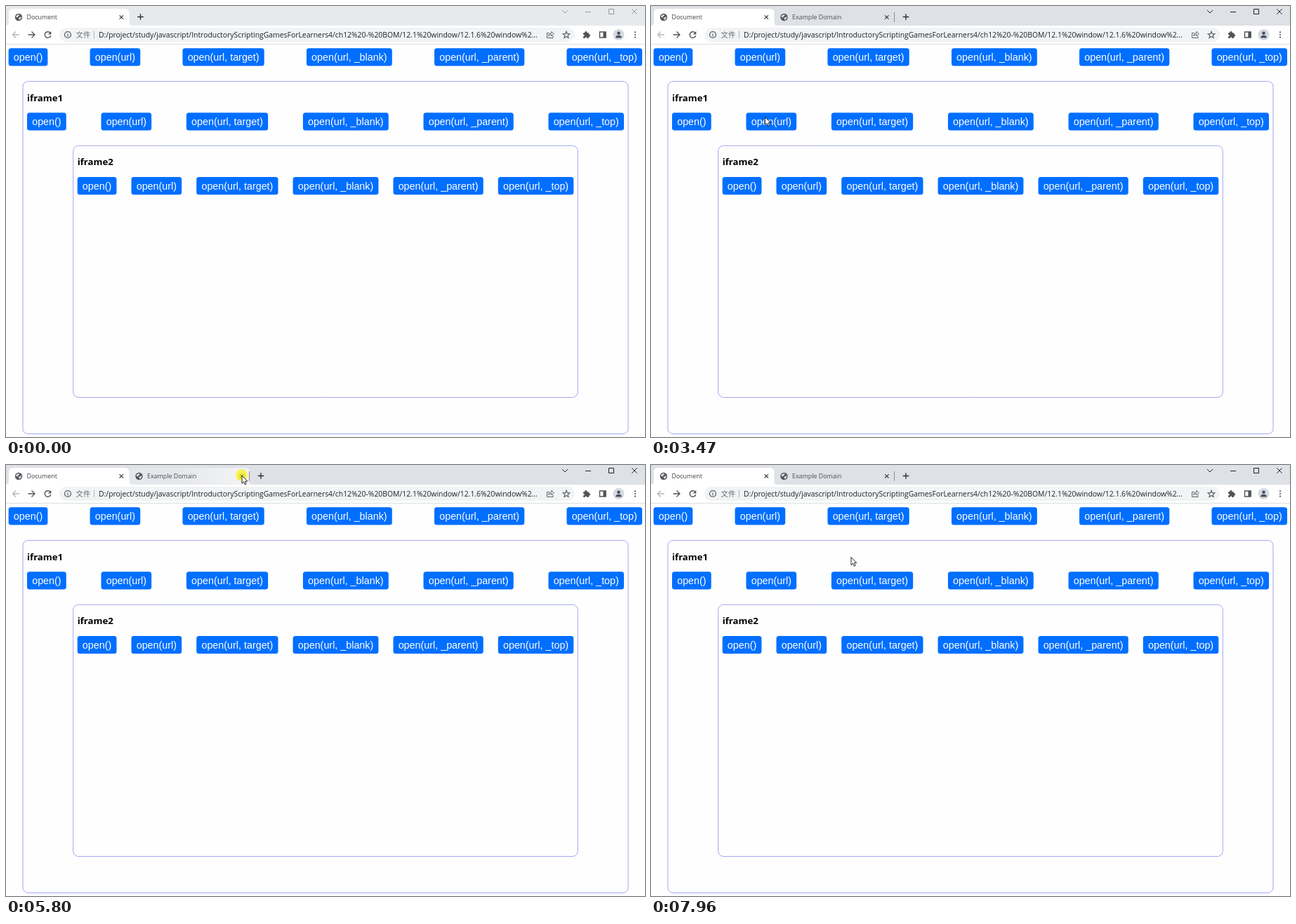
An HTML page with a canvas for the animation above (8000 ms loop, 910 by 615 pixels).

```html
<!DOCTYPE html>
<html lang="en">
<head>
<meta charset="utf-8">
<title>Opening windows</title>
<style>
  html, body { margin: 0; width: 100%; height: 100%; overflow: hidden; background: #fff; }
  canvas { display: block; width: 910px; height: 615px; }
</style>
</head>
<body>
<canvas id="stage" width="910" height="615"></canvas>
<script>
const c = document.getElementById('stage').getContext('2d');
const LOOP = 8000, PITCH = 171.5, GROW = 150;
const UI = '"Open Sans", "Noto Sans", "Noto Sans CJK SC", "Noto Sans CJK", sans-serif';
const ARIAL = '"Liberation Sans", Arial, sans-serif';
const INK = '#202124', ICON = '#505357', PALE = '#b4b7bb';
const FILE_URL = 'D:/project/study/javascript/IntroductoryScriptingGamesForLearners4' +
  '/ch12%20-%20BOM/12.1%20window/12.1.6%20window%2...';
const SITE_URL = 'summon.test';
const LABELS = ['open()', 'open(url)', 'open(url, target)', 'open(url, _blank)',
  'open(url, _parent)', 'open(url, _top)'];

// Tabs in strip order, with opening and closing times.
const TABS = [
  { title: 'Document', open: -999, close: 9999 },
  { title: 'Example Domain', open: 3942, close: 5230 },
  { title: 'Example Domain', open: 1122, close: 5890 },
  { title: 'Example Domain', open: 6750, close: 9999 }
];

// [start, page, active tab]
const VIEWS = [
  [0, 'doc', 0], [1122, 'blank', 2], [1200, 'site', 2], [3100, 'doc', 0],
  [3942, 'blank', 1], [4060, 'site', 1], [5230, 'doc', 0],
  [6750, 'blank', 3], [6850, 'site', 3], [7550, 'doc', 0]
];

// [time, x, y]
const PATH = [
  [30, 832, 604], [830, 171, 79], [1000, 171, 79], [1150, 164, 77],
  [1530, 164, 77], [1720, 158, 22], [2230, 792, 45], [2690, 792, 45],
  [3020, 87, 25], [3110, 87, 25], [3470, 162, 158], [4360, 162, 158],
  [4600, 156, 20], [4920, 335.5, 14.5], [6000, 335.5, 14.5], [6350, 303, 87],
  [6490, 301, 76.5], [7080, 301, 76.5], [7310, 83, 14], [7560, 83, 14], [7960, 284.5, 131]
];

const CLICKS = [[880, 980], [3020, 3100], [3780, 3850], [5150, 5230],
  [5800, 5880], [6610, 6660], [7490, 7550]];

const ease = p => { p = Math.min(1, Math.max(0, p)); return p * p * (3 - 2 * p); };

function cursorAt(t) {
  if (t < PATH[0][0]) return null;
  const i = PATH.findIndex(k => k[0] > t);
  if (i < 0) { const [, x, y] = PATH[PATH.length - 1]; return { x, y }; }
  const [t0, x0, y0] = PATH[i - 1], [t1, x1, y1] = PATH[i];
  const p = ease((t - t0) / (t1 - t0));
  return { x: x0 + (x1 - x0) * p, y: y0 + (y1 - y0) * p };
}

function text(s, x, y, font, color) {
  c.font = font;
  c.fillStyle = color;
  c.fillText(s, x, y);
}

function box(x, y, w, h, r, color) {
  c.beginPath();
  c.roundRect(x, y, w, h, r);
  c.fillStyle = color;
  c.fill();
}

function disc(x, y, r, color) {
  c.beginPath();
  c.arc(x, y, r, 0, 7);
  c.fillStyle = color;
  c.fill();
}

function stroke(d, x, y, color, width = 1.2) {
  c.save();
  c.translate(x, y);
  c.strokeStyle = color;
  c.lineWidth = width;
  c.stroke(new Path2D(d));
  c.restore();
}

function shape(d, x, y, color) {
  c.save();
  c.translate(x, y);
  c.fillStyle = color;
  c.fill(new Path2D(d));
  c.restore();
}

const cross = (x, y, r, color, width) =>
  stroke(`M${-r} ${-r}L${r} ${r}M${r} ${-r}L${-r} ${r}`, x, y, color, width);

function globe(x, y) {
  disc(x, y, 5.2, '#55585d');
  shape('M-3.9 -1.5Q-2 -4 .6 -4L1 -2.2L-.8 -1.6L-1 -.1L-3 .2ZM-.6 .8L2 .4L3.9 -1.2' +
    'Q4.4 1.6 2 3.4L.6 3.9L.8 2.2Z', x, y, '#e8eaed');
}

function tabShape(x, w) {
  const r = Math.min(6, w / 2), f = Math.min(5, w), e = x + w;
  c.beginPath();
  c.moveTo(x - f, 28);
  c.quadraticCurveTo(x, 28, x, 23);
  c.lineTo(x, 4 + r);
  c.quadraticCurveTo(x, 4, x + r, 4);
  c.lineTo(e - r, 4);
  c.quadraticCurveTo(e, 4, e, 4 + r);
  c.lineTo(e, 23);
  c.quadraticCurveTo(e, 28, e + f, 28);
  c.closePath();
}

function drawTab(tab, x, w, active, cur) {
  const end = x + w;
  const over = cur && cur.y > 4 && cur.y < 28 && cur.x > x && cur.x < end;
  if (active) {
    tabShape(x, w);
    c.fillStyle = '#fff';
    c.fill();
  } else if (over) {
    const g = c.createRadialGradient(cur.x, cur.y, 0, cur.x, cur.y, 95);
    g.addColorStop(0, 'rgba(255,255,255,.6)');
    g.addColorStop(1, 'rgba(255,255,255,.2)');
    tabShape(x, w);
    c.fillStyle = g;
    c.fill();
  }
  c.save();
  c.beginPath();
  c.rect(x, 0, Math.max(w, 3), 28);
  c.clip();
  if (w > 28) {
    globe(x + 14, 16);
    c.beginPath();
    c.rect(x, 0, w - 20, 28);
    c.save();
    c.clip();
    text(tab.title, x + 25.5, 19.2, '8.9px ' + UI, active ? '#3c4043' : '#4a4d51');
    c.restore();
  }
  const cx = Math.max(end - 11.2, x + 1);
  if (over && Math.hypot(cur.x - cx, cur.y - 16) < 6) disc(cx, 16, 5.7, '#d5d8dc');
  cross(cx, 16, 2.7, '#35383b', 1.2);
  c.restore();
}

function drawStrip(t, activeTab, cur) {
  const focused = t >= 880;
  box(0, 0, 910, 28, 0, focused ? '#dee1e6' : '#e7eaed');
  let x = 4, prevActive = false;
  TABS.forEach((tab, i) => {
    const w = PITCH * (ease((t - tab.open) / GROW) - ease((t - tab.close) / GROW));
    if (w <= 0.1) return;
    const active = i === activeTab;
    if (i > 0 && !active && !prevActive) stroke('M0 9V23', x, 0, '#8c9095', 1);
    drawTab(tab, x, w, active, cur);
    x += w;
    prevActive = active;
  });
  if (!prevActive) stroke('M0 9V23', Math.floor(x) - .5, 0, '#8c9095', 1);
  stroke('M-4.3 0H4.3M0 -4.3V4.3', x + 16, 15.5, '#303336', 1.4);

  const ctl = focused ? INK : '#96999d';
  stroke('M-4 -2L0 2L4 -2', 796, 8, ctl, 1);
  stroke('M-4 .5H4', 829, 8, ctl, 1);
  stroke('M-3.5 -3.5H3.5V3.5H-3.5Z', 862, 8, ctl, 1);
  cross(895, 8, 3.7, ctl, 1);
}

function drawToolbar(page) {
  const doc = page === 'doc';
  box(0, 28, 910, 26, 0, '#fff');
  box(0, 54, 910, 1, 0, '#dcdee1');
  box(76, 31, 734, 20, 10, '#f1f3f4');

  stroke('M5 0H-4.3M0 -4.5L-4.5 0L0 4.5', 14, 41, PALE, 1.3);
  stroke('M-5 0H4.3M0 -4.5L4.5 0L0 4.5', 36.5, 41, doc ? ICON : PALE, 1.3);
  if (page === 'blank') cross(59.5, 41, 4, ICON, 1.5);
  else {
    stroke('M3.2 -2.9A4.3 4.3 0 1 0 4.2 1.2', 59.5, 41, ICON, 1.4);
    shape('M4.8 -5V-.6H.4Z', 59.5, 41, ICON);
  }

  if (page === 'site') {
    box(85, 39.5, 6.6, 5.5, .8, ICON);
    stroke('M-1.9 0V-1.7A1.9 1.9 0 0 1 1.9 -1.7V0', 88.3, 39.7, ICON, 1.1);
  } else {
    stroke('M-4.5 0A4.5 4.5 0 1 1 4.5 0A4.5 4.5 0 1 1 -4.5 0M0 -.7V2.6M0 -2.6V-1.4', 88, 41, ICON, 1.1);
  }

  const font = '10.4px ' + UI;
  if (doc) {
    text('文件', 99.5, 44.7, font, '#6a6e73');
    stroke('M0 35.5V46.5', 125.5, 0, '#b4b7bb', 1);
    text(FILE_URL, 132, 44.7, font, INK);
  } else text(SITE_URL, 99.5, 44.7, font, INK);

  stroke('M-1.5 -2.5H-4.5V4.5H4V2M-2.3 1.8Q-2 -2.3 2 -2.3V-4.6L5.3 -1.2L2 2V-.2Q-.8 -.2 -2.3 1.8Z',
    775, 41, ICON, .9);
  let star = '';
  for (let i = 0; i < 10; i++) {
    const r = i % 2 ? 2.2 : 5.1, a = i * Math.PI / 5 - Math.PI / 2;
    star += (i ? 'L' : 'M') + r * Math.cos(a) + ' ' + r * Math.sin(a);
  }
  stroke(star + 'Z', 798, 41.4, ICON, 1.1);

  box(822, 38.3, 8.2, 7.7, 1, ICON);
  disc(825.8, 37.8, 1.7, ICON);
  disc(830.4, 42, 1.7, ICON);
  disc(822.2, 42.2, 1.4, '#fff');
  disc(826, 46, 1.4, '#fff');

  stroke('M-4.3 -4H4.3V4H-4.3Z', 849.8, 41, ICON, 1.4);
  box(850.4, 37, 4, 8, 0, ICON);

  disc(872.5, 41, 8, '#d6dae2');
  disc(872.5, 38.8, 2.3, '#4a5060');
  shape('M-4.2 4.5V3.4Q-3.6 .8 0 .8Q3.6 .8 4.2 3.4V4.5Z', 872.5, 41, '#4a5060');
  for (const dy of [-3.7, 0, 3.7]) disc(896, 41 + dy, 1.1, ICON);
}

function buttonRow(left, right, y) {
  const pad = 7.17, font = '14.34px ' + ARIAL;
  c.font = font;
  const widths = LABELS.map(s => c.measureText(s).width + 2 * pad);
  const gap = (right - left - widths.reduce((a, b) => a + b)) / (LABELS.length - 1);
  let x = left;
  LABELS.forEach((s, i) => {
    box(x, y, widths[i], 25.2, 3.5, '#006fff');
    text(s, x + pad, y + 17.5, font, '#fff');
    x += widths[i] + gap;
  });
}

function panel(name, x, y, w, h) {
  c.beginPath();
  c.roundRect(x, y, w, h, 7.5);
  c.strokeStyle = '#a3a6f7';
  c.lineWidth = 1;
  c.stroke();
  text(name, x + 6, y + 28, 'bold 13.2px ' + UI, '#000');
  buttonRow(x + 6, x + w - 6, y + 44.7);
}

function drawDocument() {
  buttonRow(3.6, 906, 60.2);
  panel('iframe1', 24, 107.5, 862, 503);
  panel('iframe2', 95.7, 199.3, 718.6, 359.2);
}

function drawSite() {
  box(0, 55, 910, 560, 0, '#eeeff1');
  c.save();
  c.shadowColor = 'rgba(0,0,0,.06)';
  c.shadowBlur = 6;
  c.shadowOffsetX = 1;
  c.shadowOffsetY = 2;
  box(217, 112, 476, 172, 6, '#fdfdfe');
  c.restore();
  const font = '11.74px ' + UI;
  text('Example Domain', 239.5, 173.5, 'bold 23.1px ' + UI, '#000');
  text('This domain is for use in illustrative examples in documents. You may use this', 239.5, 206.3, font, '#000');
  text('domain in literature without prior coordination or asking for permission.', 239.5, 220.8, font, '#000');
  text('More information...', 239.5, 246.8, font, '#38488f');
}

function drawCursor(cur, t) {
  if (CLICKS.some(([a, b]) => t >= a && t < b)) disc(cur.x, cur.y, 8.5, 'rgba(255,245,0,.65)');
  const d = 'M.5 .5V11.8L3 9.4L4.8 13.3L6.6 12.5L4.9 8.7H8.3Z';
  shape(d, cur.x, cur.y, '#fff');
  stroke(d, cur.x, cur.y, '#111', .9);
}

function draw(t) {
  const [, page, active] = VIEWS.filter(v => v[0] <= t).pop();
  const cur = cursorAt(t);
  box(0, 0, 910, 615, 0, '#fefefe');
  if (page === 'doc') drawDocument();
  if (page === 'site') drawSite();
  drawStrip(t, active, cur);
  drawToolbar(page);
  if (cur) drawCursor(cur, t);
}

const start = performance.now();
function tick() {
  draw((performance.now() - start) % LOOP);
  requestAnimationFrame(tick);
}
tick();
</script>
</body>
</html>
```
